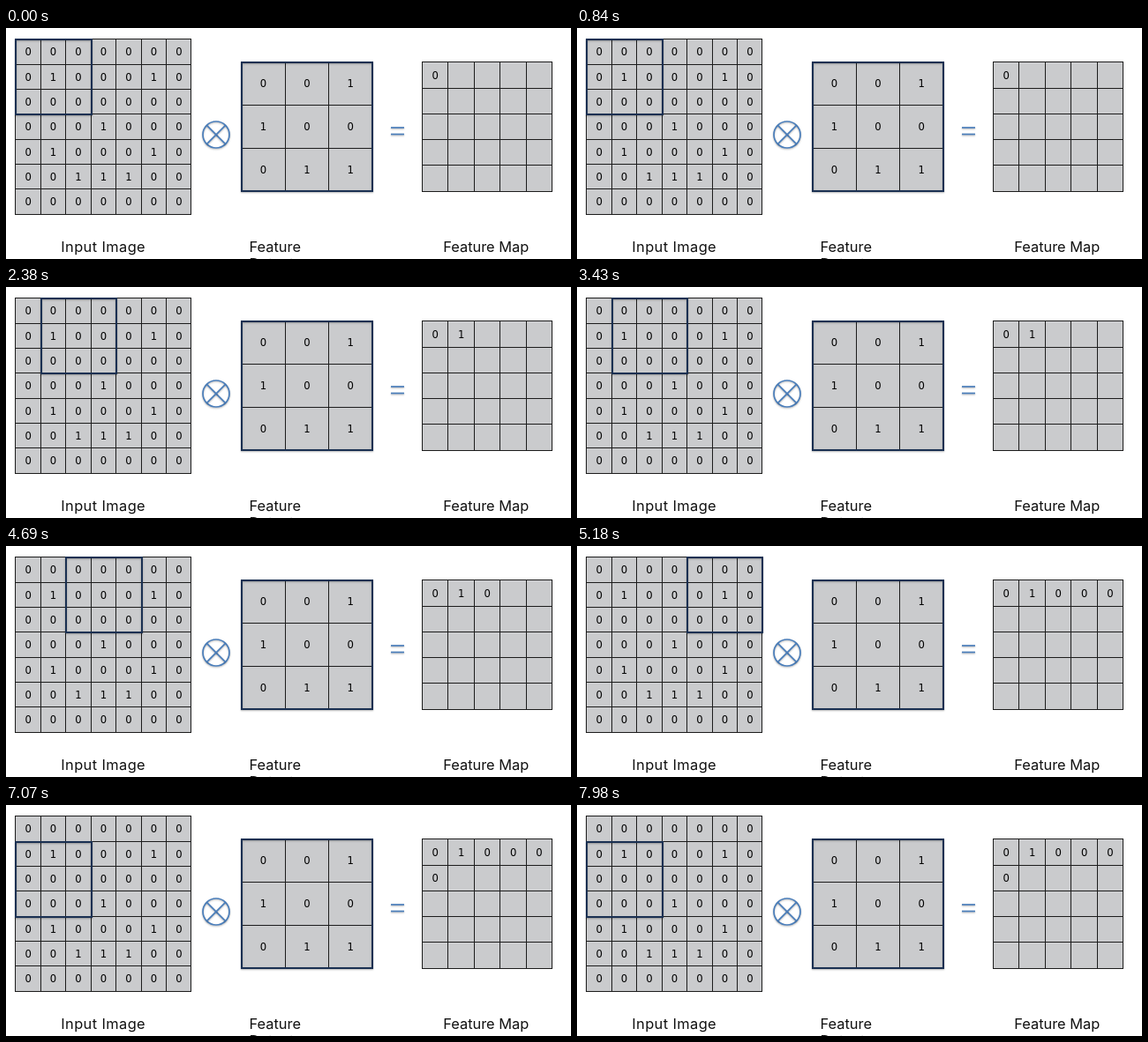
An HTML page with a canvas that plays this animation: 640x262 px, repeating every 8000 ms.

```html
<!DOCTYPE html>
<html lang="en">
<head>
<meta charset="utf-8">
<title>Convolution</title>
<style>
html, body { margin: 0; width: 100%; height: 100%; overflow: hidden; background: #fff; }
canvas { display: block; }
</style>
</head>
<body>
<canvas width="640" height="262"></canvas>
<script>
const ctx = document.querySelector('canvas').getContext('2d');
const LOOP = 8000;
const NAVY = '#1a3052', BLUE = '#4a7ebb';
const moves = [1120, 4270, 4830, 5180, 5600]; // when the window advances

const parse = rows => rows.split(' ').map(r => [...r].map(Number));
const input = parse('0000000 0100010 0000000 0001000 0100010 0011100 0000000');
const kernel = parse('001 100 011');

const inputGrid = { x: 10.65, y: 12.7, w: 199.3, h: 198.45, n: 7 };
const kernelGrid = { x: 266.6, y: 38.4, w: 148.2, h: 146.5, n: 3 };
const mapGrid = { x: 471.3, y: 38.8, w: 147.25, h: 146.25, n: 5 };

// Centre of the pixel that holds grid line i
const lineX = (g, i) => Math.floor(g.x + g.w * i / g.n) + 0.5;
const lineY = (g, i) => Math.floor(g.y + g.h * i / g.n) + 0.5;

function line(x1, y1, x2, y2) {
  ctx.beginPath();
  ctx.moveTo(x1, y1);
  ctx.lineTo(x2, y2);
  ctx.stroke();
}

function pen(color, width) {
  ctx.strokeStyle = color;
  ctx.lineWidth = width;
}

function shadow(on) {
  ctx.shadowColor = on ? 'rgba(0,0,0,.3)' : 'transparent';
  ctx.shadowBlur = 2;
  ctx.shadowOffsetY = 1;
}

function grid(g) {
  const l = lineX(g, 0), r = lineX(g, g.n), t = lineY(g, 0), b = lineY(g, g.n);
  ctx.fillStyle = '#cacbcd';
  ctx.fillRect(l, t, r - l, b - t);
  pen('#1c1c1c', 1);
  for (let i = 0; i <= g.n; i++) {
    line(lineX(g, i), t - 0.5, lineX(g, i), b + 0.5);
    line(l, lineY(g, i), r, lineY(g, i));
  }
}

function digit(g, row, col, value) {
  ctx.fillStyle = '#000';
  ctx.font = '11.6px "DejaVu Sans", sans-serif';
  ctx.textAlign = 'center';
  ctx.fillText(value, g.x + g.w * (col + 0.5) / g.n + 0.2, g.y + g.h * (row + 0.5) / g.n + 4.4);
}

function digits(g, values) {
  values.forEach((r, i) => r.forEach((v, j) => digit(g, i, j, v)));
}

function frame(g, row, col, size) {
  const x = lineX(g, col), y = lineY(g, row);
  pen(NAVY, 2);
  shadow(true);
  ctx.strokeRect(x + 0.5, y + 0.5, lineX(g, col + size) - x, lineY(g, row + size) - y);
  shadow(false);
}

function symbols() {
  const x = 238, y = 121, r = 15, d = r * Math.SQRT1_2;
  pen(BLUE, 1.7);
  shadow(true);
  ctx.beginPath();
  ctx.arc(x, y, r, 0, 2 * Math.PI);
  ctx.stroke();
  line(x - d, y - d, x + d, y + d);
  line(x - d, y + d, x + d, y - d);
  line(436, 113, 451, 113);
  line(436, 120.5, 451, 120.5);
  shadow(false);
}

function label(text, x, y, spacing = '0px') {
  ctx.fillStyle = '#111';
  ctx.font = '16.4px Inter, sans-serif';
  ctx.letterSpacing = spacing;
  ctx.textAlign = 'left';
  ctx.fillText(text, x, y);
  ctx.letterSpacing = '0px';
}

function convolve(row, col) {
  let sum = 0;
  kernel.forEach((r, i) => r.forEach((k, j) => sum += k * input[row + i][col + j]));
  return sum;
}

function draw(now) {
  const t = now % LOOP;
  const step = moves.filter(m => t >= m).length;
  const cell = s => [Math.floor(s / mapGrid.n), s % mapGrid.n];

  ctx.fillStyle = '#fff';
  ctx.fillRect(0, 0, 640, 262);

  grid(inputGrid);
  frame(inputGrid, ...cell(step), 3);
  digits(inputGrid, input);

  grid(kernelGrid);
  frame(kernelGrid, 0, 0, 3);
  digits(kernelGrid, kernel);

  grid(mapGrid);
  for (let s = 0; s <= step; s++) digit(mapGrid, ...cell(s), convolve(...cell(s)));

  symbols();
  label('Input Image', 62.3, 253.5, '0.4px');
  label('Feature', 275.5, 253.5);
  label('Detector', 275.5, 272.5);
  label('Feature Map', 495.2, 253.5);
}

const start = performance.now();
function tick() {
  draw(performance.now() - start);
  requestAnimationFrame(tick);
}
tick();
</script>
</body>
</html>
```
